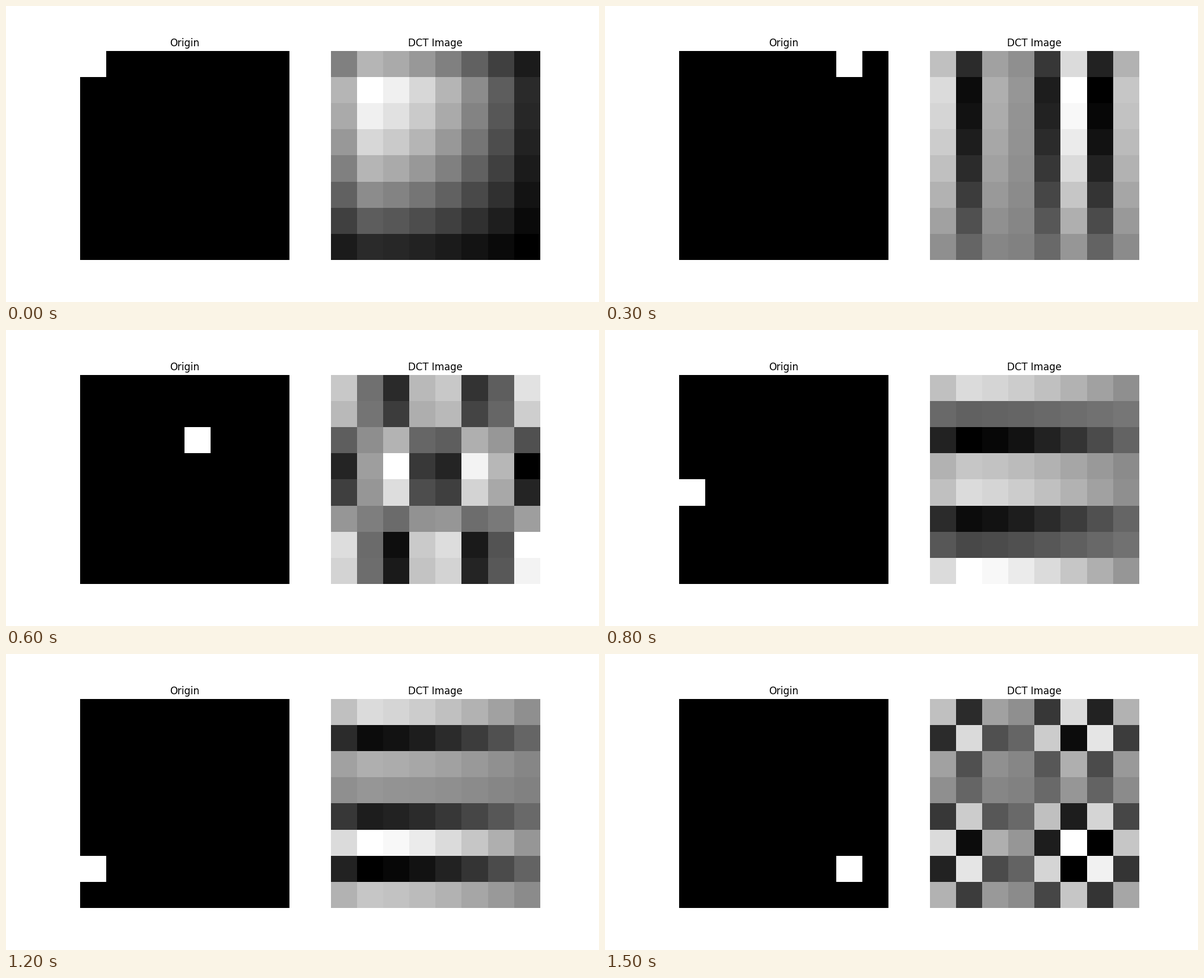
A matplotlib script for the animation above (1.6 s loop, 1000 by 500 pixels).

```python
import numpy as np
import matplotlib.pyplot as plt
from matplotlib.animation import FuncAnimation

SIZE = 8
STEP = 2
PER_ROW = SIZE // STEP
FRAMES = PER_ROW ** 2
INTERVAL = 100


def dct_matrix(size):
    """Orthonormal DCT-II basis, one frequency per row."""
    freq = np.arange(size)[:, None]
    pos = np.arange(size)[None, :]
    basis = np.sqrt(2 / size) * np.cos(np.pi * (2 * pos + 1) * freq / (2 * size))
    basis[0] = np.sqrt(1 / size)
    return basis


DCT = dct_matrix(SIZE)


def impulse(frame):
    row, col = divmod(frame, PER_ROW)
    block = np.zeros((SIZE, SIZE))
    block[row * STEP, col * STEP] = 1
    return block


def make_panel(ax, title, data):
    ax.set_title(title, fontfamily="DejaVu Sans", fontsize=12)
    ax.axis("off")
    return ax.imshow(data, cmap="gray", interpolation="nearest")


fig, (left, right) = plt.subplots(1, 2, figsize=(10, 5), dpi=100)
start = impulse(0)
origin = make_panel(left, "Origin", start)
spectrum = make_panel(right, "DCT Image", DCT @ start @ DCT.T)


def update(frame):
    block = impulse(frame)
    origin.set_data(block)
    spectrum.set_data(DCT @ block @ DCT.T)
    spectrum.autoscale()  # each spectrum spans the full black-to-white range
    return origin, spectrum


anim = FuncAnimation(fig, update, frames=FRAMES, interval=INTERVAL,
                     repeat=True, repeat_delay=0, blit=False)
plt.show()
```
